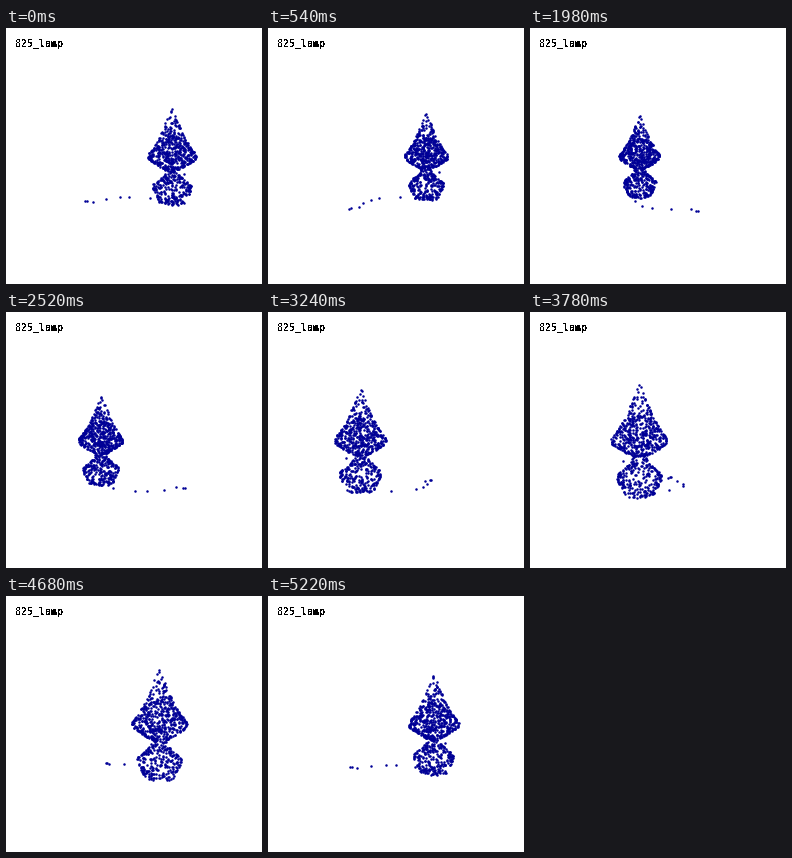
These frames come from a looping animation (256 by 256 pixels, 5.4 s). A matplotlib script:

```python
import numpy as np
import matplotlib.pyplot as plt
from matplotlib.animation import FuncAnimation

SIZE, DPI = 256, 128
FRAMES, STEP_MS = 30, 180
PX = 72 / DPI                    # points per pixel
CX, CY, DEPTH = 128, 129, 205    # view centre and camera distance
FLOOR = 44.3
AXIS = (36.7, -4.5)              # lamp axis: across, away
rng = np.random.default_rng(825)


def revolve(profile, n):
    """Scatter n points evenly over a surface of revolution."""
    r, y = np.array(profile, float).T
    area = np.hypot(np.diff(r), np.diff(y)) * (r[1:] + r[:-1])
    seg = rng.choice(len(area), n, p=area / area.sum())
    r0, r1 = r[seg], r[seg + 1]
    u = rng.random(n)
    rad = np.sqrt(r0**2 + u * (r1**2 - r0**2))
    flat = np.isclose(r0, r1)
    t = np.where(flat, u, (rad - r0) / np.where(flat, 1, r1 - r0))
    a = rng.uniform(0, 2 * np.pi, n)
    return np.column_stack([AXIS[0] + rad * np.cos(a),
                            y[seg] + t * (y[seg + 1] - y[seg]),
                            AXIS[1] + rad * np.sin(a)])


def ball(radius, y, n):
    a = np.linspace(0, np.pi, 13)
    return revolve(np.column_stack([radius * np.sin(a), y - radius * np.cos(a)]), n)


shade = revolve([(1, -46.5), (3, -41), (8, -28), (12, -18.5), (18.5, -8),
                 (23, -2), (22.5, 2), (14, 8), (5, 13)], 380)
bulb = ball(13, -8, 110)
neck = revolve([(4, 12), (6, 15), (7, 18)], 22)
base = revolve([(7, 18), (18.5, 28), (18, 32), (15, 38), (12, FLOOR), (0, FLOOR)], 230)
tip = np.array([[AXIS[0], -46.5, AXIS[1]]])
switch = np.array([[47, 16, -14]])
cord = np.array([(x, FLOOR, z) for x, z in [
    (-49.5, .5), (-47.5, .5), (-41, -1), (-30.2, 12.4),
    (-16, 22), (-5.6, 24), (16.8, 16)]])
cloud = np.vstack([shade, bulb, neck, base, tip, switch, cord])


def project(angle):
    x, y, z = cloud.T
    c, s = np.cos(angle), np.sin(angle)
    scale = DEPTH / (DEPTH + x * s + z * c)
    return np.column_stack([CX + scale * (x * c - z * s), CY + scale * y])


fig = plt.figure(figsize=(SIZE / DPI, SIZE / DPI), dpi=DPI, facecolor="white")
ax = fig.add_axes([0, 0, 1, 1])
ax.set(xlim=(0, SIZE), ylim=(SIZE, 0))
ax.axis("off")
label = ax.text(9, 19, "825_lamp", family="DejaVu Sans Mono", weight="bold",
                size=10 * PX, color="black", va="baseline")
label.set_antialiased(False)
dots = ax.scatter(*project(0).T, s=(2.5 * PX)**2, c="#000096",
                  linewidths=0, antialiased=False)


def draw(k):
    dots.set_offsets(project(2 * np.pi * k / FRAMES))
    return dots,


anim = FuncAnimation(fig, draw, frames=FRAMES, interval=STEP_MS,
                     repeat=True, repeat_delay=0)
plt.show()
```
